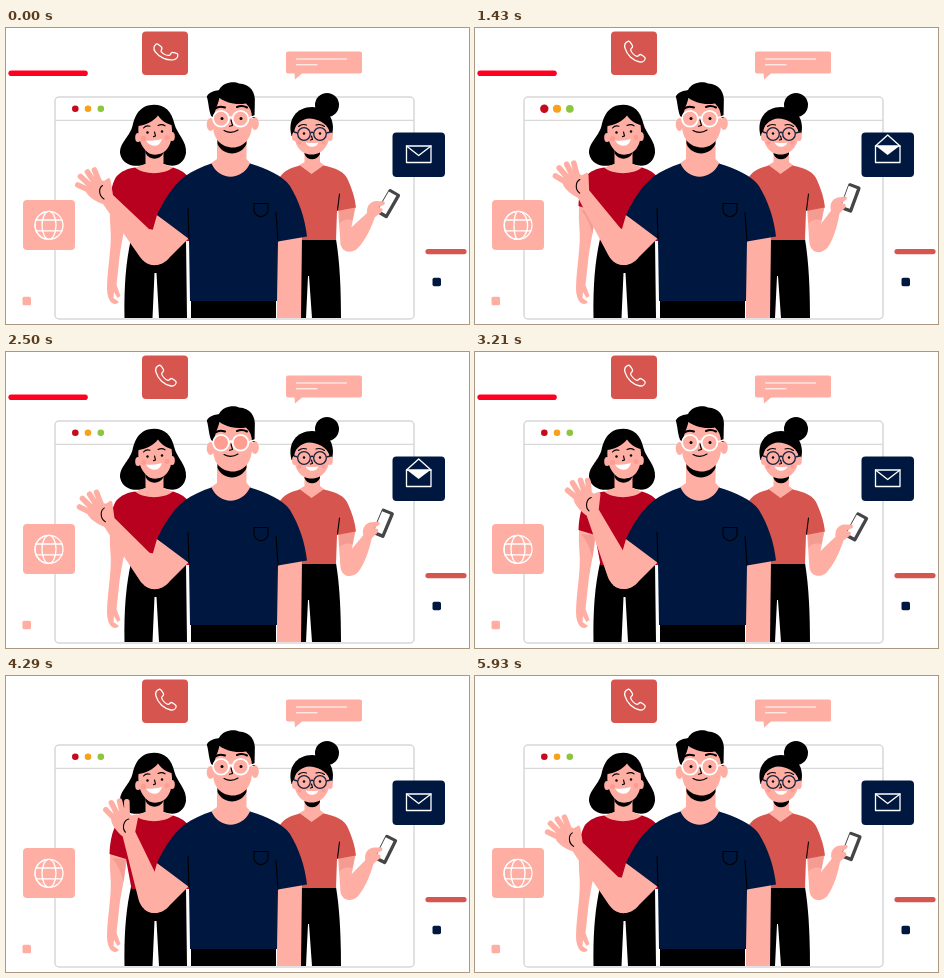
An HTML page for the animation above (6000 ms loop, 463 by 296 pixels).

```html
<!DOCTYPE html>
<html lang="en">
<head>
<meta charset="utf-8">
<title>Team greeting</title>
<style>
  html, body { margin: 0; width: 100%; height: 100%; overflow: hidden; background: #fff; }
  svg { display: block; width: 463px; height: 296px; }
  .skin { fill: #ffaea4; }
  .shade { fill: #f59c92; }
  .navy { fill: #001840; }
  .coral { fill: #d6564f; }
  .red { fill: #b8001f; }
  .white { fill: #fff; }
  .blush { fill: #ff9b92; }
  .ink, .limb, .thin { fill: none; stroke-linecap: round; stroke-linejoin: round; }
  .ink { stroke: #000; stroke-width: 1.1; }
  .limb { stroke: #ffaea4; }
  .thin { stroke: #fff; stroke-width: 1.3; }
</style>
</head>
<body>
<svg viewBox="0 0 463 296">
  <!-- Browser window -->
  <rect x="49" y="69" width="359" height="222" rx="4" fill="#fff" stroke="#d8d8d8" stroke-width="1.5"/>
  <path d="M49 92.3H408" stroke="#d8d8d8" stroke-width="1.3"/>
  <g id="dots">
    <circle cx="69.3" cy="80.8" r="3.3" fill="#c50a1c"/>
    <circle cx="82" cy="80.8" r="3.3" fill="#f6a21c"/>
    <circle cx="94.8" cy="80.8" r="3.3" fill="#8cc63f"/>
  </g>

  <!-- Floating decorations -->
  <path id="streak" d="M5.2 45.3H79" stroke="#ff0020" stroke-width="5.6" stroke-linecap="round"/>
  <path d="M422 223.6H458" stroke="#d6564f" stroke-width="5.2" stroke-linecap="round"/>
  <rect class="navy" x="426.5" y="249.7" width="8.5" height="8.5" rx="1.8"/>
  <rect class="skin" x="16.5" y="268.7" width="8.5" height="8.5" rx="1.5"/>
  <path class="skin" d="M282 23.5H354Q356 23.5 356 25.5V43.5Q356 45.5 354 45.5H296L289 51.5L288.5 45.5H282Q280 45.5 280 43.5V25.5Q280 23.5 282 23.5Z"/>
  <path class="thin" style="stroke-width:1" d="M290.5 31H340.5M290.5 36.8H311"/>

  <!-- Call tile -->
  <rect class="coral" x="136" y="3.5" width="46" height="43.5" rx="4"/>
  <path id="call" class="thin" d="M153.6 13.2C151 14 149 16.5 150 20.2C152 27.2 158 32.6 165 34C168 34.2 170 32.2 170.2 30.2C170.2 29.2 166.5 26.5 165.3 26.5C164 26.5 163.3 28.5 162 28.3C159.5 27.6 156.5 24.6 155.6 21.9C155.5 20.6 157.7 19.9 157.6 18.4C157.5 17.2 155 13.2 153.6 13.2Z"/>

  <!-- Mail tile -->
  <rect class="navy" x="386.5" y="104.5" width="52.5" height="44.5" rx="4"/>
  <path id="letter" class="white" d="M401 118H424.5L412.6 127Z"/>
  <path class="thin" d="M400.5 118H425V134.5H400.5Z"/>
  <path id="flap" class="thin"/>

  <!-- Globe tile -->
  <rect class="skin" x="17" y="172" width="52" height="50" rx="4"/>
  <circle class="thin" cx="43" cy="197.3" r="14"/>
  <path class="thin" d="M30 192H56M30 202.8H56"/>
  <path id="globe" class="thin"/>

  <!-- Left colleague -->
  <g>
    <path class="skin" d="M104 177L121 181C119 202 114.500 218 113 234L110.500 257L114.500 268L111.500 270L108 264L107.500 270L113 274Q110 277.500 106 275Q101 271 101 260C101.500 238 106 219 104.500 201Q103.500 190 104 177Z"/>
    <path class="shade" d="M106 182L120 183L117.500 206Q114 191 106 182Z"/>
    <path d="M125 211H180L181 290H153L150.500 245H148.500L146.500 290H118.500C118 258 120 233 125 211Z"/>
    <path d="M148 76.800C134 77 129 87 126.500 98C123 110 113 115 114.200 126C117 138 130 140 140 136H158C168 140 178 137 180 125C181 113 171 106 168.500 96C165.500 83 159 77 148 76.800Z"/>
    <path class="skin" d="M139.500 118H157.500V136L168 140C160 149 138 149 128 140L139.500 136Z"/>
    <path class="red" d="M129 139.500C138 147 158 147 167 139.500C175 142 180 145 185 152V213H125.500L120 183L103.500 178C104 166 106 156 110 149C115 143 122 140.500 129 139.500Z"/>
    <path d="M139.500 122C144 128 153 128 157.500 122V125C154 132.500 143 132.500 139.500 125Z"/>
    <ellipse class="skin" cx="132" cy="109.500" rx="2.800" ry="4.500"/>
    <ellipse class="skin" cx="166" cy="108.500" rx="2.800" ry="4.500"/>
    <path class="skin" d="M132.500 98C140 97 148 93 152 87.500C156 93 161 96 165.500 97C168 113 162 126.500 149.500 126.500C139 126.500 131 114 132.500 98Z"/>
    <path class="ink" d="M137.500 100Q140 97 144 98.200M152 97.500Q156 95.500 159 97.800M148.500 104L149.500 108L147.500 108.600"/>
    <circle cx="141.500" cy="104.500" r="1.200"/><circle cx="156" cy="103.500" r="1.200"/>
    <circle class="blush" cx="137.500" cy="110.500" r="2.500"/><circle class="blush" cx="161" cy="109.500" r="2.500"/>
    <path class="white" d="M140 112.500Q148 113.500 156 111Q154 118 148 117.800Q143 117.500 140 112.500Z"/>
  </g>

  <!-- Right colleague -->
  <g>
    <path d="M272 211H330C334 235 335 263 335 290H306L303 248H302L300 290H272Z"/>
    <circle cx="321" cy="77" r="12"/>
    <path d="M285.500 108C281 91 291 79 306 79C321 79 330 91 326 107L322 109H290Z"/>
    <path class="skin" d="M332 181L349.500 179L345.500 199L349 219Q340 227 334.500 216Z"/>
    <path class="shade" d="M333 182L349 180L346.500 192Q339 190 333.500 195Z"/>
    <g id="forearm">
      <g transform="translate(382.200 175.600) rotate(30)">
        <rect x="-6.500" y="-13.800" width="13" height="27.600" rx="1.800" fill="#454547"/>
        <rect class="white" x="-5.600" y="-10.800" width="8.800" height="21.200"/>
      </g>
      <path class="skin" d="M334.500 216C336 206 344 201 349 196L361 185C360.500 177 365 173.500 370 173L378 173.500Q380 175.500 377.500 177L372.500 179L376.500 181Q377 184 373 186L369 189C364 203 358 214 351 221C344 226 336 224 334.500 216Z"/>
    </g>
    <path class="skin" d="M298.500 118H314V134L319 138L305.500 147.500L292 138L298.500 134Z"/>
    <path class="coral" d="M294 137.500L305.500 146L317.500 137.500C330 140 339 144 342 152C346 161 349 170 350 179.500L331 183L330 212H272V152C277 143 284 140 294 137.500Z"/>
    <path class="ink" d="M333.500 166L331.500 182"/>
    <path d="M298.500 122Q306 128 314 122V126C311 133 301 133 298.500 126Z"/>
    <ellipse class="skin" cx="324" cy="108.500" rx="2.800" ry="4.500"/>
    <ellipse class="skin" cx="288.500" cy="108.500" rx="2.500" ry="4.500"/>
    <path class="skin" d="M288.500 102C290 95 297 91 303 90.500C312 91 320 95 323 102C325 116 317 126.500 305.500 126.500C294 126.500 287 116 288.500 102Z"/>
    <path class="ink" stroke-width="1.500" d="M292.500 98.500Q296 95.500 300.500 97M310 97Q314.500 95.500 318.500 98.500M305.500 108L306.500 111.500L304.500 112"/>
    <g fill="none" stroke="#17233f" stroke-width="1.300">
      <circle cx="298" cy="106" r="6.300"/><circle cx="314" cy="106" r="6.300"/>
      <path d="M304.300 105Q306 103.500 307.700 105M291.700 105L288 104M320.300 105L325 104"/>
    </g>
    <circle cx="298" cy="105.500" r="1.200"/><circle cx="314" cy="105.500" r="1.200"/>
    <circle class="blush" cx="293.500" cy="114.500" r="2"/><circle class="blush" cx="317.500" cy="114.500" r="2"/>
    <path class="white" d="M299.500 114.500Q306 115.500 312.500 114.500Q310.500 119 305.800 118.800Q301.500 118.500 299.500 114.500Z"/>
  </g>

  <!-- Waving man -->
  <path class="skin" d="M151 187L184 209L164 229C156 239 145 239 138 233L147 201Z"/>
  <g id="wave">
    <g class="limb" stroke-width="5.600">
      <path d="M86 163.500L71.800 157M88 161L74.500 148.500M91 158L81.500 144M95 158L88.500 142"/>
    </g>
    <path class="skin" d="M80 159C83 152 91 150 98 153L101 151Q103.500 148.500 104.500 152L107 167L143 201C165 203 168 231 154 236C147 239 139 236 134 229L97 176C91 174 84 170 80.500 165Z"/>
    <path class="ink" d="M96.500 157.500C92.500 160 92.500 168 98 171"/>
  </g>
  <path class="skin" d="M271 211L296 208L295 290H271Z"/>
  <path d="M185 272H270V290H185Z"/>
  <path class="skin" d="M211 112H240.500V131L245 136C236 155 213 155 204 136L211 131Z"/>
  <path class="navy" d="M205.500 135.500C213 153 236 153 244 135.500C261 140.500 277 148 284 158C293 173 299 190 301 208.500L272 213.500L271 273H184L183 211L151 187C158 172 166 159 178 149C186 143 196 138.500 205.500 135.500Z"/>
  <path class="ink" d="M182 180L183 210.500M270 184L272 213M248 175.500H262V182Q262 187 255 189Q248 187 248 182Z"/>
  <path d="M211.500 108C216 119 236 119 240.500 108V116C235 128.500 217 128.500 211.500 116Z"/>
  <ellipse class="skin" cx="204.500" cy="96.500" rx="3.800" ry="6.500"/>
  <ellipse class="skin" cx="249" cy="95.500" rx="3.800" ry="6.500"/>
  <path class="skin" d="M207 71H246V96C246 111 237 119.500 227 119.500C215 119.500 207 111 207 97Z"/>
  <path d="M206 90C202.500 83 203 76 200.800 68.500C203 64 208 63 213 62C217 54 228 53 233 55.500C244 56 250 64 248.800 75L248.500 90H246C246 84 244 79 240 75.500C229 77.500 219 74 213.500 70C211.500 78 208.500 82 208 90Z"/>
  <path class="ink" style="stroke-width:2" d="M209.500 80.500Q213 77.500 219 79.500M231 79Q236 76.800 241 79.500"/>
  <circle cx="216" cy="90.500" r="1.500"/><circle cx="235" cy="90.500" r="1.500"/>
  <g id="lids" fill="#ff9d91">
    <circle cx="215" cy="90.800" r="7.600"/><circle cx="234.500" cy="90.800" r="7.600"/>
  </g>
  <g class="thin" style="stroke-width:1.800">
    <circle cx="215" cy="90.800" r="7.900"/><circle cx="234.500" cy="90.800" r="7.900"/>
    <path d="M222.900 90Q224.800 88.500 226.600 90M207.200 90L203.500 88.500M242.400 90L249 88"/>
  </g>
  <path class="ink" d="M225 92L226.500 97.500L223.500 98.300M218 102.500Q225 106.500 232 102"/>
</svg>
<script>
  const LOOP = 6000;
  const el = id => document.getElementById(id);
  const parts = {};
  for (const id of ['streak', 'call', 'letter', 'flap', 'globe', 'forearm', 'wave', 'lids']) parts[id] = el(id);
  const dots = [...el('dots').children];

  const clamp = v => Math.min(1, Math.max(0, v));
  const ramp = (t, from, to) => {
    const u = clamp((t - from) / (to - from));
    return u * u * (3 - 2 * u);
  };
  // Swings from 0 to 1 and back once per period.
  const swing = (t, period) => (1 - Math.cos(2 * Math.PI * t / period)) / 2;
  const turn = (part, angle, x, y) => part.setAttribute('transform', `rotate(${angle} ${x} ${y})`);

  // Meridians 60 degrees apart turn around the globe's axis.
  function drawGlobe(t) {
    const phase = 180 * clamp(t / 1930);
    let d = '';
    for (let i = 0; i < 3; i++) {
      const angle = (phase + i * 60) % 180 - 90;
      const x = 14 * Math.sin(angle * Math.PI / 180);
      d += `M43 183.3A${Math.abs(x).toFixed(2)} 14 0 0 ${x > 0 ? 1 : 0} 43 211.3`;
    }
    parts.globe.setAttribute('d', d);
  }

  function drawMail(t) {
    const open = ramp(t, 850, 1280) - ramp(t, 2560, 2900);
    const tip = 127.5 - 20.5 * open;
    parts.flap.setAttribute('d', `M400.5 118L412.7 ${tip}L425 118`);
    parts.letter.style.opacity = tip < 118 ? 1 : 0;
  }

  function draw(t) {
    turn(parts.wave, 22 * swing(t, 1200), 149, 222);
    turn(parts.forearm, -11 * swing(t, 3600), 346, 213);
    turn(parts.call, t < 1260 ? -20 * Math.cos(2 * Math.PI * t / 560) : 0, 160, 24);
    parts.streak.style.opacity = t < 3600 ? 1 : 0;
    parts.lids.style.opacity = ramp(t, 2380, 2450) - ramp(t, 2570, 2660);
    dots.forEach((dot, i) => {
      const pulse = clamp((t - 1000 - 80 * i) / 930);
      dot.setAttribute('r', 3.3 + 0.9 * swing(pulse, 1));
    });
    drawGlobe(t);
    drawMail(t);
  }

  const start = performance.now();
  function tick() {
    draw((performance.now() - start) % LOOP);
    requestAnimationFrame(tick);
  }
  tick();
</script>
</body>
</html>
```
